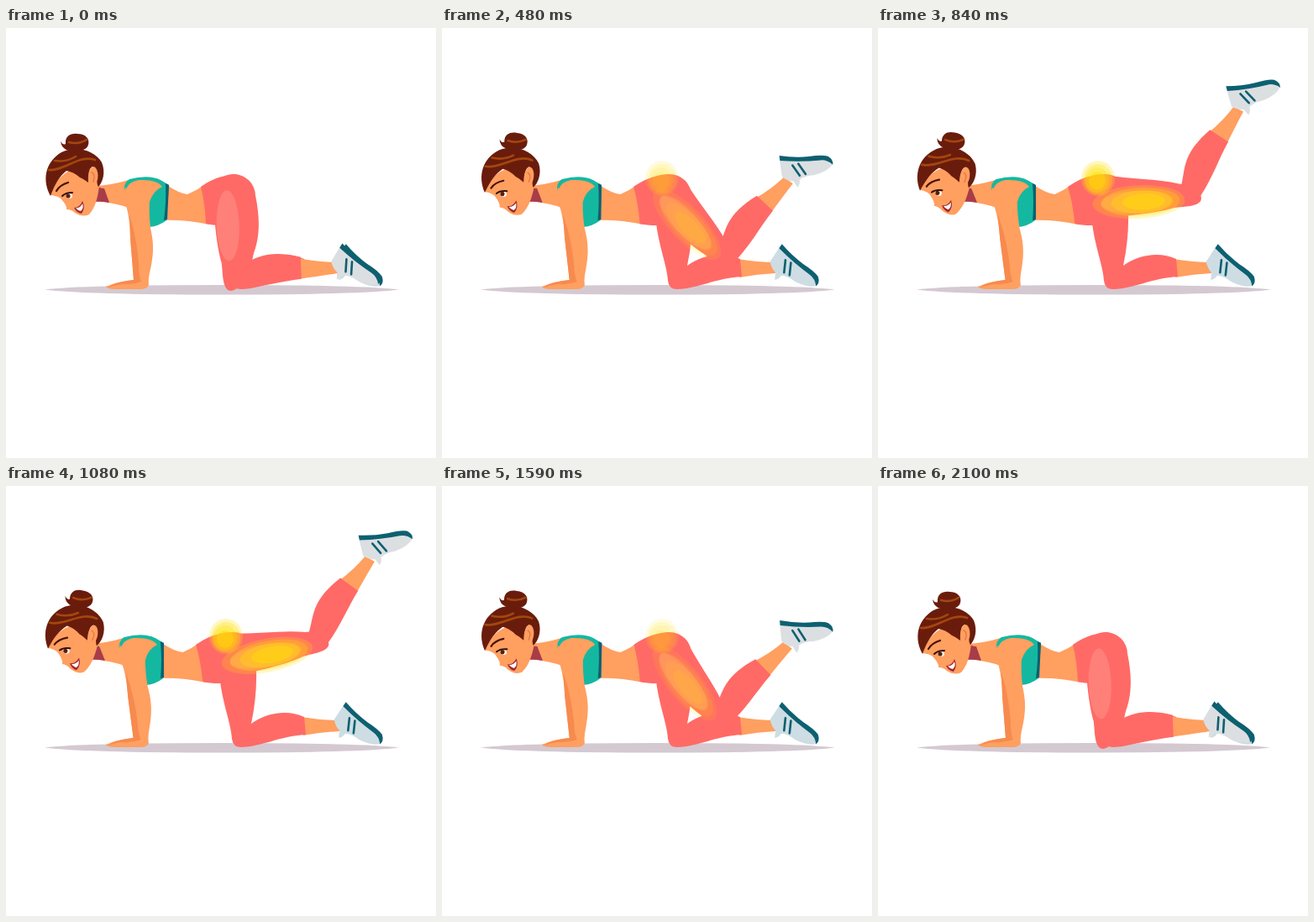
Write an HTML page that moves like this. It is 512 px wide and 512 px high and loops after 2220 ms.

```html
<!DOCTYPE html>
<html lang="en">
<head>
<meta charset="utf-8">
<title>Leg raise</title>
<style>
html, body { margin: 0; width: 100%; height: 100%; overflow: hidden; background: #fff; }
svg { display: block; width: 100%; height: 100%; }
.skin { fill: #ff9f60; }
.shade { fill: #f78a4e; }
.pants { fill: #ff6a66; }
.teal { fill: #14b8a0; }
.deep { fill: #0d6070; }
.hair { fill: #6a1c0c; }
.line { fill: none; stroke-linecap: round; }
.glow { fill: #ffe000; }
</style>
</head>
<body>
<svg viewBox="0 0 512 512">
  <defs>
    <g id="shoe">
      <path d="M-11-27L-7-4Q0 1 7 1Q9 5 12 8Q15 4 14-1Q20-6 31-7Q48-12 53-21L44-26Z"/>
      <path class="deep" d="M-11-29Q8-27 24-29Q40-32 47-30Q54-26 53-20Q46-26 38-25Q16-22-10-23Z"/>
      <path class="line" stroke="#0d6070" stroke-width="2.6" stroke-linecap="butt" d="M5-18L14-6M12-20L21-8"/>
    </g>
  </defs>

  <path fill="#d4c9d1" d="M46 311.5Q90 306 257 306T468 311.5Q420 317.5 257 317.5T46 311.5Z"/>

  <!-- supporting leg -->
  <path class="skin" d="M352 275Q376 279 397 279V292Q376 293 354 297Z"/>
  <path class="pants" d="M254 222C256 255 268 282 269 301Q270 311 280 311C306 310 325 298 357 296L355 275C334 265 308 271 292 283Q299 250 298 218Z"/>
  <use href="#shoe" fill="#cddde3" transform="translate(393 286) rotate(43)"/>

  <g id="torso">
    <path class="skin" d="M106 188Q126 187 146 181L190 186Q206 197 216 198Q226 194 236 187L242 234Q214 228 186 229L140 212Q122 207 104 206Z"/>
    <path fill="#a83c48" d="M107 187Q111 191 117 191L123 208Q114 206 104 207Z"/>
    <path class="pants" d="M232 189Q252 175 274 174L280 235H258Q246 235 238 233Q237 209 232 189Z"/>
    <path class="teal" d="M141 194Q140 184 147 180Q170 174 184 181L194 187L191 229Q182 236 170 237L164 205L142 190Z"/>
    <path class="deep" d="M190 185L194 187L192 228L188 229Q191 206 190 185Z"/>
    <path class="skin" d="M143 192Q146 183 158 181Q180 180 186 189Q175 194 171 207Q170 220 172 238C175 252 177 264 172 287Q169 299 170 306Q168 311 160 311L128 311Q119 310 119 308Q132 302 152 300L148 250Q148 230 143 211Z"/>
    <path class="shade" d="M147 222Q156 250 158 282Q158 296 161 302Q150 306 139 305Q128 306 122 309Q126 303 152 300L148 250Z"/>
  </g>

  <g id="head">
    <path class="skin" d="M97 165C78 165 60 175 53 199Q63 200 66 204Q73 212 72 216Q78 216 82 220Q91 226 99 222C106 214 109 204 111 188Z"/>
    <path class="hair" d="M53 200C43 182 46 160 66 148C84 139 106 146 114 160C119 172 115 184 110 189C107 184 108 166 103 165Q97 168 98 184Q91 179 88 178Q80 171 72 170C64 176 58 186 53 200Z"/>
    <path class="hair" d="M65 135Q68 140 71 138C70 128 78 125 85 126C95 126 100 132 98 139C96 147 82 148 75 146Q66 144 65 135Z"/>
    <path class="line" stroke="#a3470f" stroke-width="2.6" d="M51 169C68 171 88 150 106 157M58 158Q72 160 83 153M75 136Q86 139 96 133"/>
    <ellipse class="skin" cx="104" cy="176" rx="5.5" ry="11"/>
    <path class="line" stroke="#e87a45" stroke-width="1.5" d="M102 172Q107 174 104 183"/>
    <path class="line" stroke="#4a1208" stroke-width="2.2" d="M60 194Q64 187 74 184"/>
    <ellipse fill="#fff" cx="75" cy="200" rx="4" ry="3"/>
    <circle fill="#5a200c" cx="74" cy="200" r="2.6"/>
    <path class="line" stroke="#35100a" stroke-width="2" d="M67 200Q71 196 79 196"/>
    <path fill="#a3262c" d="M81 214Q88 214 91 206Q95 214 90 221Q84 220 81 214Z"/>
    <path fill="#fff" d="M83 214.500Q89 214 91 209Q93 215 89 218Q85 217 83 214.500Z"/>
  </g>

  <circle class="pants" cx="271" cy="200" r="26"/>
  <g id="thigh">
    <g id="shin">
      <path class="skin" d="M76-17Q98-9 119-7L120 6Q100 7 76 9Z"/>
      <path class="pants" d="M-8-10C22-10 28-34 81-17L80 9C55 10 35 15 8 14Q-8 14-8-10Z"/>
      <use id="foot" href="#shoe" fill="#dcdfe2"/>
    </g>
    <path class="pants" id="flesh"/>
    <ellipse fill="#ff8078" cx="35" cy="9" rx="42" ry="13.500"/>
    <g id="heat" class="glow"></g>
  </g>
  <g id="spot" class="glow"></g>
</svg>
<script>
const $ = id => document.getElementById(id);
const put = (id, transform) => $(id).setAttribute('transform', transform);

// nested translucent rings: [cx, cy, rx, ry, opacity]
const rings = (id, list) => $(id).innerHTML = list.map(([x, y, rx, ry, o]) =>
  `<ellipse cx="${x}" cy="${y}" rx="${rx}" ry="${ry}" opacity="${o}"/>`).join('');

rings('heat', [[38, 9, 55, 20, .22], [40, 9, 47, 17, .27], [42, 9, 37, 13.5, .35], [44, 9, 25, 9.5, .45]]);
rings('spot', [[262, 179, 20, 21, .25], [262, 180, 17, 18, .3], [261, 181, 14, 15, .3], [261, 182, 10, 10.5, .45]]);

function draw(now) {
  const t = Math.floor(now % 2220 / 30) * 30;
  const p = Math.min(1, t / 900, Math.max(0, (2100 - t) / 1030)) ** 1.4;
  const lean = 1 - (1 - p) ** 2;
  const heat = Math.min(1, 1.28 * p);

  put('torso', `matrix(1 0 ${.05 * lean} 1 ${-15.4 * lean} 0)`);
  put('head', `translate(${-lean} 0) rotate(${7.5 * lean} 100 182)`);

  const hip = 88 - 100 * p;
  const shin = -4.5 - 149 * p + 98 * p * p;
  put('thigh', `translate(272 200) rotate(${hip})`);
  put('shin', `translate(96 4) rotate(${shin - hip})`);
  put('foot', `translate(119 -1) rotate(${45 + 20 * p - 13 * p * p})`);

  const back = 18 + 12 * Math.max(0, 1 - 3 * p);
  $('flesh').setAttribute('d',
    `M0-25C30-${back} 60-${back} 88-10C104-8 116 3 112 11C108 18 92 17 80 18C60 23 40 24 0 26Z`);
  $('heat').setAttribute('opacity', heat);
  $('spot').setAttribute('opacity', heat);
}

const start = performance.now();
(function tick() {
  draw(performance.now() - start);
  requestAnimationFrame(tick);
})();
</script>
</body>
</html>
```
